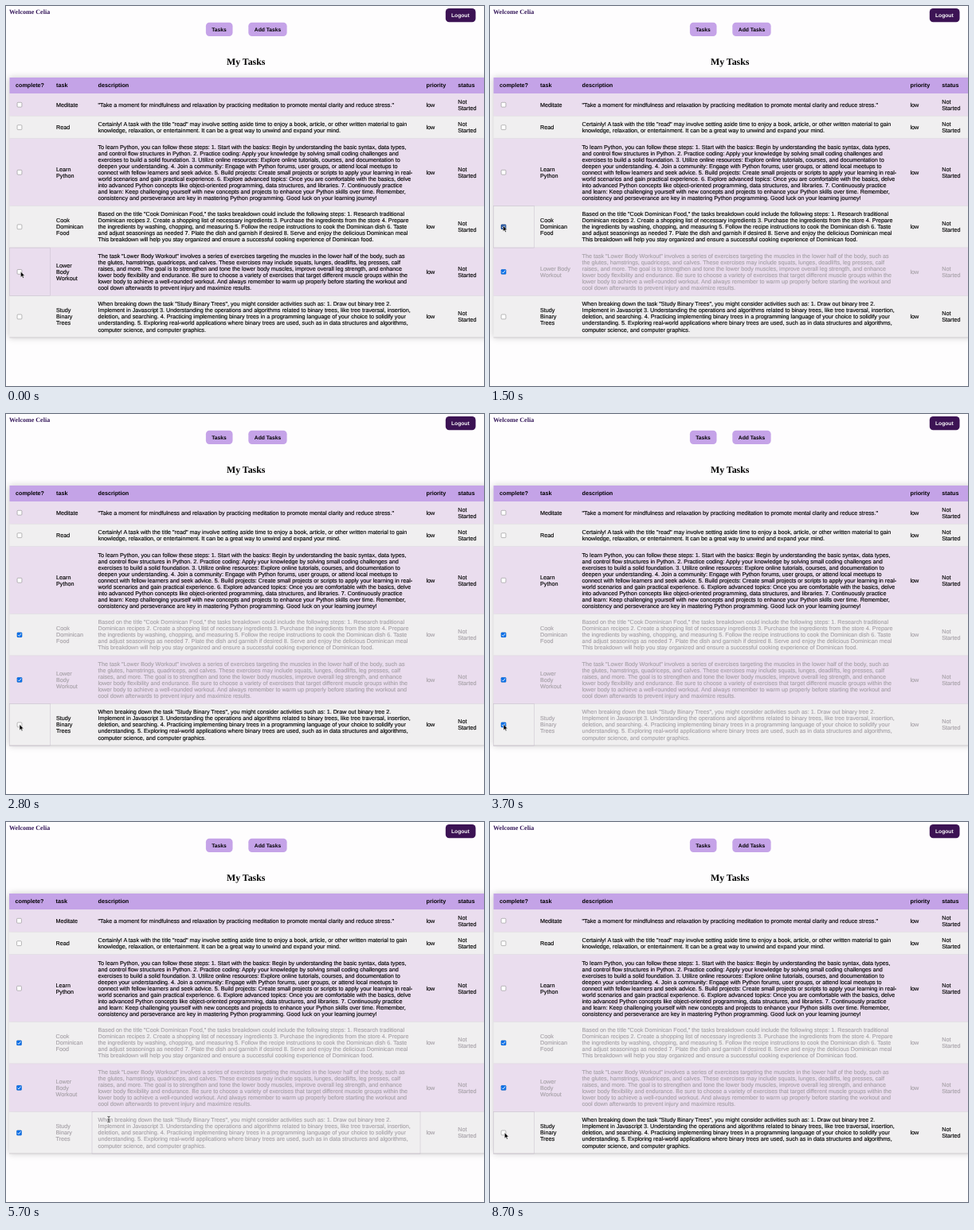
An HTML page that plays this animation: 600x478 px, repeating every 8.8 s.

```html
<!DOCTYPE html>
<html lang="en">
<head>
<meta charset="utf-8">
<title>My Tasks</title>
<style>
html, body { margin: 0; width: 100%; height: 100%; overflow: hidden; background: #fefdfe; }
svg { display: block; width: 100vw; height: 100vh; }
text { font: 7.2px "Liberation Sans", Arial, sans-serif; text-rendering: geometricPrecision; white-space: pre; stroke-width: .15; }
.bold { font-weight: bold; }
.button { font-size: 6.7px; font-weight: bold; }
.serif { font-family: "Liberation Serif", "Times New Roman", serif; font-weight: bold; }
</style>
</head>
<body>
<svg id="stage" viewBox="0 0 600 478">
  <defs>
    <filter id="soft" x="-10%" y="-10%" width="120%" height="120%"><feGaussianBlur stdDeviation="4.5"/></filter>
  </defs>
</svg>
<script>
const LOOP = 8800, TICK = 100;
const TOP = 90, HEAD = 20, LINE = 8.03, ROW = 28.45;
const EDGES = [4, 55.3, 108, 520, 560, 604];
const TEXT_X = [11.5, 62.5, 115.5, 527.5, 567.3];
const GREY = '#a6a1a7', BLUE = '#0b6fe6', PRESSED = '#1d4f9e';

// check: [on, off] of the box; done: [on, off] of the greyed text
const ROWS = [
  { task: ['Meditate'], text: [
    '"Take a moment for mindfulness and relaxation by practicing meditation to promote mental clarity and reduce stress."'] },
  { task: ['Read'], text: [
    'Certainly! A task with the title "read" may involve setting aside time to enjoy a book, article, or other written material to gain',
    'knowledge, relaxation, or entertainment. It can be a great way to unwind and expand your mind.'] },
  { task: ['Learn', 'Python'], text: [
    'To learn Python, you can follow these steps: 1. Start with the basics: Begin by understanding the basic syntax, data types,',
    'and control flow structures in Python. 2. Practice coding: Apply your knowledge by solving small coding challenges and',
    'exercises to build a solid foundation. 3. Utilize online resources: Explore online tutorials, courses, and documentation to',
    'deepen your understanding. 4. Join a community: Engage with Python forums, user groups, or attend local meetups to',
    'connect with fellow learners and seek advice. 5. Build projects: Create small projects or scripts to apply your learning in real-',
    'world scenarios and gain practical experience. 6. Explore advanced topics: Once you are comfortable with the basics, delve',
    'into advanced Python concepts like object-oriented programming, data structures, and libraries. 7. Continuously practice',
    'and learn: Keep challenging yourself with new concepts and projects to enhance your Python skills over time. Remember,',
    'consistency and perseverance are key in mastering Python programming. Good luck on your learning journey!'] },
  { task: ['Cook', 'Dominican', 'Food'], check: [1500, LOOP], done: [1600, LOOP], text: [
    'Based on the title "Cook Dominican Food," the tasks breakdown could include the following steps: 1. Research traditional',
    'Dominican recipes 2. Create a shopping list of necessary ingredients 3. Purchase the ingredients from the store 4. Prepare',
    'the ingredients by washing, chopping, and measuring 5. Follow the recipe instructions to cook the Dominican dish 6. Taste',
    'and adjust seasonings as needed 7. Plate the dish and garnish if desired 8. Serve and enjoy the delicious Dominican meal',
    'This breakdown will help you stay organized and ensure a successful cooking experience of Dominican food.'] },
  { task: ['Lower', 'Body', 'Workout'], wide: ['Lower Body', 'Workout'], check: [300, LOOP], done: [400, LOOP], text: [
    'The task "Lower Body Workout" involves a series of exercises targeting the muscles in the lower half of the body, such as',
    'the glutes, hamstrings, quadriceps, and calves. These exercises may include squats, lunges, deadlifts, leg presses, calf',
    'raises, and more. The goal is to strengthen and tone the lower body muscles, improve overall leg strength, and enhance',
    'lower body flexibility and endurance. Be sure to choose a variety of exercises that target different muscle groups within the',
    'lower body to achieve a well-rounded workout. And always remember to warm up properly before starting the workout and',
    'cool down afterwards to prevent injury and maximize results.'] },
  { task: ['Study', 'Binary', 'Trees'], check: [3600, 8500], done: [3700, 8600], text: [
    'When breaking down the task "Study Binary Trees", you might consider activities such as: 1. Draw out binary tree 2.',
    'Implement in Javascript 3. Understanding the operations and algorithms related to binary trees, like tree traversal, insertion,',
    'deletion, and searching. 4. Practicing implementing binary trees in a programming language of your choice to solidify your',
    'understanding. 5. Exploring real-world applications where binary trees are used, such as in data structures and algorithms,',
    'computer science, and computer graphics.'] }
];

// time, x, y of the pointer
const PATH = [
  [0, 18.4, 334], [500, 18.4, 334], [1000, 16.4, 276.5], [1600, 16.4, 276.3], [2100, 70, 332.5],
  [2700, 17, 390.5], [3800, 17, 390.5], [4500, 118, 377], [5700, 129, 374], [7000, 122, 376],
  [7600, 46.3, 383.7], [8200, 18.3, 390.7], [8800, 18.3, 390.7]
];

const stage = document.getElementById('stage');

function add(parent, tag, attrs, content) {
  const node = document.createElementNS(stage.namespaceURI, tag);
  set(node, attrs);
  if (content) node.textContent = content;
  parent.appendChild(node);
  return node;
}
function set(node, attrs) {
  for (const key in attrs) node.setAttribute(key, attrs[key]);
}
function show(node, on) {
  node.setAttribute('visibility', on ? 'visible' : 'hidden');
}
function box(parent, x, y, width, height, fill, more) {
  return add(parent, 'rect', { x, y, width, height, fill, ...more });
}
function label(parent, x, y, content, more) {
  return add(parent, 'text', { x, y, ...more }, content);
}
function block(parent, x, mid, lines) {
  const group = add(parent, 'g', {});
  lines.forEach((line, i) => label(group, x, mid + 2.5 + (i - (lines.length - 1) / 2) * LINE, line));
  return group;
}
function button(x, y, width, height, fill, content, textX, color) {
  box(stage, x, y, width, height, fill, { rx: 4.5 });
  label(stage, textX, y + height / 2 + 2.4, content, { class: 'button', fill: color });
}

// Page header
label(stage, 4, 10, 'Welcome Celia', { class: 'serif', fill: '#35185a', style: 'font-size:8.05px' });
button(551.8, 3, 37.7, 17.3, '#3c1354', 'Logout', 559, '#fff');
button(250.9, 20.7, 33.6, 17.4, '#c5a3e8', 'Tasks', 258.2, '#000');
button(304.3, 20.7, 48.3, 17.4, '#c5a3e8', 'Add Tasks', 311.8, '#000');
label(stage, 277, 74, 'My Tasks', { class: 'serif', style: 'font-size:11.85px' });

// Table
let y = TOP + HEAD;
for (const row of ROWS) {
  row.top = y;
  row.height = ROW + LINE * (Math.max(2, row.text.length) - 2);
  y += row.height;
}
const bottom = y;
box(stage, 4, TOP, 600, bottom - TOP, '#000', { opacity: .2, filter: 'url(#soft)' });
const back = add(stage, 'g', {});
const left = add(stage, 'g', {});
box(back, 4, TOP, 600, HEAD, '#c4a3e7');
['complete?', 'task', 'description', 'priority', 'status'].forEach((name, i) =>
  label(i < 2 ? left : stage, TEXT_X[i], TOP + HEAD / 2 + 2.4, name, { class: 'bold' }));

ROWS.forEach((row, i) => {
  const mid = row.top + row.height / 2;
  const end = row.top + row.height;
  box(back, 4, row.top, 600, row.height, i % 2 ? '#f0eff0' : '#eaddee');
  box(back, 4, end - .45, 600, .45, i === 5 ? '#aaa5ac' : '#d6d0d9');

  row.near = add(left, 'g', {});
  row.far = add(stage, 'g', {});
  row.name = block(row.near, TEXT_X[1], mid, row.task);
  if (row.wide) row.alt = block(row.near, TEXT_X[1], mid, row.wide);
  block(row.far, TEXT_X[2], mid, row.text);
  block(row.far, TEXT_X[3], mid, ['low']);
  block(row.far, TEXT_X[4], mid, ['Not', 'Started']);

  box(left, 13.6, mid - 2.9, 5.8, 5.8, '#fff', { rx: 1, stroke: '#777', 'stroke-width': .5 });
  row.tick = add(left, 'g', {});
  box(row.tick, 13.3, mid - 3.2, 6.4, 6.4, 'inherit', { rx: 1 });
  row.tick.firstChild.removeAttribute('fill');
  add(row.tick, 'path', { d: `M14.6 ${mid + .2}l1.4 1.4 2.5-3.3`, fill: 'none', stroke: '#fff', 'stroke-width': .9 });
});

const hover = box(stage, 0, 0, 0, 0, 'none', { stroke: '#c3bac8', 'stroke-width': .45 });
const arrow = add(stage, 'path', {
  d: 'M0 0V7.2L1.7 5.7 2.8 8.3 4 7.8 2.9 5.3H5.1Z',
  fill: '#000', stroke: '#fff', 'stroke-width': .5
});
const beam = add(stage, 'g', {});
for (const [stroke, width] of [['#fff', 1.5], ['#111', .75]]) {
  add(beam, 'path', {
    d: 'M-1.6-3.6Q0-3.6 0-2.7Q0-3.6 1.6-3.6M0-2.7V2.7M-1.6 3.6Q0 3.6 0 2.7Q0 3.6 1.6 3.6M-1 .8H1',
    fill: 'none', stroke, 'stroke-width': width
  });
}

function pointer(t) {
  const i = PATH.findIndex(p => p[0] > t);
  const [t0, x0, y0] = PATH[i - 1], [t1, x1, y1] = PATH[i];
  const u = (t - t0) / (t1 - t0), k = u * u * (3 - 2 * u);
  return [x0 + (x1 - x0) * k, y0 + (y1 - y0) * k];
}
const during = (span, t) => !!span && t >= span[0] && t < span[1];

function draw(t) {
  const [px, py] = pointer(t);
  const col = EDGES.findIndex(e => e > px) - 1;
  const over = ROWS.find(r => py < r.top + r.height);
  const shift = col === 0 ? .5 : 0;

  set(left, { transform: `translate(${shift} 0)` });
  set(back, { transform: `translate(${shift} 0)` });
  set(hover, {
    x: EDGES[col] + shift, y: over.top,
    width: EDGES[col + 1] - EDGES[col] - shift, height: over.height
  });

  for (const row of ROWS) {
    const done = during(row.done, t);
    const ink = done ? GREY : '#000';
    set(row.near, { fill: ink, stroke: ink });
    set(row.far, { fill: ink, stroke: ink });
    set(row.tick, { fill: done ? BLUE : PRESSED });
    show(row.tick, during(row.check, t));
    if (row.alt) {
      const wide = t >= row.done[0] && t < 1900;
      show(row.alt, wide);
      show(row.name, !wide);
    }
  }

  const place = { transform: `translate(${px} ${py})` };
  set(arrow, place);
  set(beam, place);
  show(arrow, col === 0);
  show(beam, col > 0);
}

const start = performance.now();
function loop() {
  const t = (performance.now() - start) % LOOP;
  draw(Math.floor(t / TICK) * TICK);
  requestAnimationFrame(loop);
}
draw(0);
requestAnimationFrame(loop);
</script>
</body>
</html>
```
